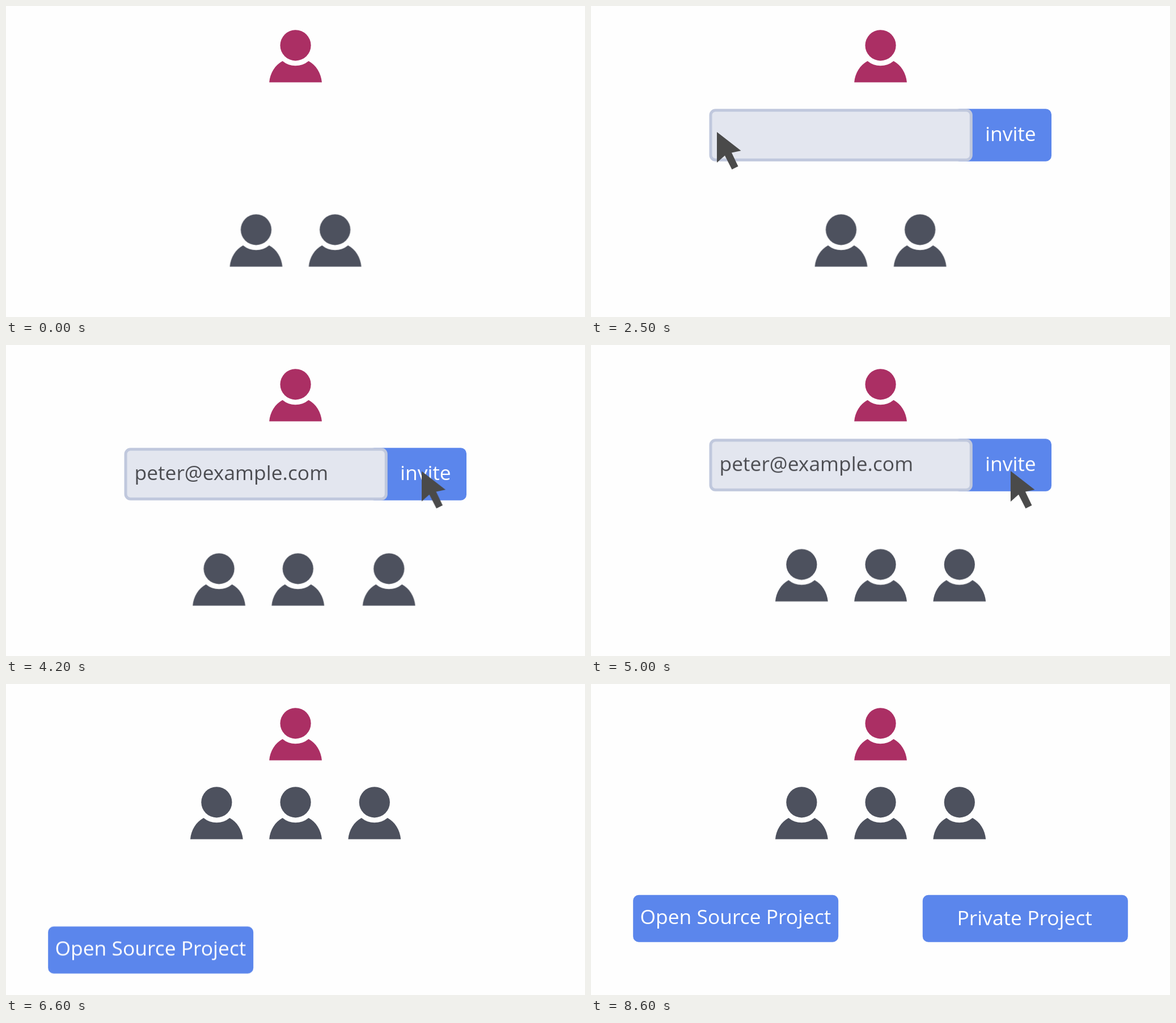
An HTML page without scripts that plays this animation: 1021x548 px, repeating every 8.7 s.

```html
<!DOCTYPE html>
<html lang="en">
<head>
<meta charset="utf-8">
<title>Invite a teammate</title>
<style>
  html, body { margin: 0; width: 100%; height: 100%; overflow: hidden; background: #fefefe; }
  svg { display: block; width: 1021px; height: 548px; }
  text { font: 35.4px "Open Sans", sans-serif; fill: #fff; white-space: pre; }

  .lead { fill: #ab2f64; }
  .team { fill: #4d515e; }
  .blue { fill: #5b86ec; }
  .field { fill: #e3e6ef; stroke: #c0c8dd; stroke-width: 5; }
  .pointer { fill: #4a4a4a; }
  .email { fill: #4c4d52; }

  .form, .team, .member, .pointer, .card {
    animation: 8.7s cubic-bezier(.37, 0, .63, 1) infinite;
  }
  .form { animation-name: form; }
  .team { animation-name: rise; }
  .member { animation-name: shift; }
  .member.new { animation-name: join; }
  .pointer { animation-name: point; }
  .card { animation-name: card1; }
  .card.second { animation-name: card2; }
  .email tspan {
    animation: type 8.7s step-end calc(var(--i) * 34ms) infinite both;
  }

  @keyframes form {
    0%, 8.391% { transform: translate(-813px, 0); }
    12.414%, 56.563% { transform: translate(0, 0); }
    63.678%, 100% { transform: translate(0, -397px); }
  }
  @keyframes rise {
    0%, 56.563% { transform: translateY(324.8px); }
    63.678%, 100% { transform: translateY(139px); }
  }
  /* existing members make room to the left */
  @keyframes shift {
    0%, 42.299% { transform: translateX(69.6px); }
    49.425%, 100% { transform: translateX(0); }
  }
  @keyframes join {
    0%, 42.299% { transform: translateX(420px); }
    49.425%, 100% { transform: translateX(0); }
  }
  @keyframes point {
    0%, 17.931% { transform: translate(1025px, 222px); }
    25.287%, 31.839% { transform: translate(222px, 222px); }
    38.736% { transform: translate(732.5px, 222px); }
    56.667% { transform: translate(732.5px, 222px); animation-timing-function: cubic-bezier(.333, 0, .667, .333); }
    59.77% { transform: translate(840px, 222px); animation-timing-function: linear; }
    62.069% { transform: translate(936px, 222px); animation-timing-function: linear; }
    63.218% { transform: translate(980.5px, 222px); animation-timing-function: linear; }
    64.368%, 100% { transform: translate(1025px, 222px); }
  }
  @keyframes type {
    0% { visibility: hidden; }
    28.966%, 100% { visibility: visible; }
  }
  @keyframes card1 {
    0%, 73.448% { transform: translateY(177px); }
    77.356%, 100% { transform: translateY(0); }
  }
  @keyframes card2 {
    0%, 81.908% { transform: translateY(177px); }
    85.816%, 100% { transform: translateY(0); }
  }
</style>
</head>
<body>
<svg viewBox="0 0 1021 548">
  <defs>
    <g id="person">
      <circle cy="69.3" r="27.1"/>
      <path d="M-46.4 134.6C-45 118-36 104-23 97A36 36 0 0 0 23 97C36 104 45 118 46.4 134.6Z"/>
    </g>
    <rect id="card" y="371.8" width="362" height="83" rx="10"/>
  </defs>

  <use href="#person" x="510.6" class="lead"/>

  <g class="team">
    <g class="member"><use href="#person" x="371.4"/></g>
    <g class="member"><use href="#person" x="510.6"/></g>
    <g class="member new"><use href="#person" x="649.8"/></g>
  </g>

  <g class="form">
    <rect class="blue" x="640" y="181.2" width="172" height="92.6" rx="10"/>
    <rect class="field" x="211" y="183.7" width="459.3" height="87.6" rx="8.5"/>
    <text x="695" y="238">invite</text>
    <text class="email" x="226.5" y="238"><tspan style="--i:0">p</tspan><tspan style="--i:1">e</tspan><tspan style="--i:2">t</tspan><tspan style="--i:3">e</tspan><tspan style="--i:4">r</tspan><tspan style="--i:5">@</tspan><tspan style="--i:6">e</tspan><tspan style="--i:7">x</tspan><tspan style="--i:8">a</tspan><tspan style="--i:9">m</tspan><tspan style="--i:10">p</tspan><tspan style="--i:11">l</tspan><tspan style="--i:12">e</tspan><tspan style="--i:13">.</tspan><tspan style="--i:14">c</tspan><tspan style="--i:15">o</tspan><tspan style="--i:16">m</tspan></text>
  </g>

  <g class="card">
    <use href="#card" x="74.2" class="blue"/>
    <text x="86.5" y="423">Open Source Project</text>
  </g>
  <g class="card second">
    <use href="#card" x="584.8" class="blue"/>
    <text x="645.5" y="425">Private Project</text>
  </g>

  <path class="pointer" d="M0 0V54L14 41.5 26.5 66 37.5 60.5 26 36.5 42.5 33Z"/>
</svg>
</body>
</html>
```
